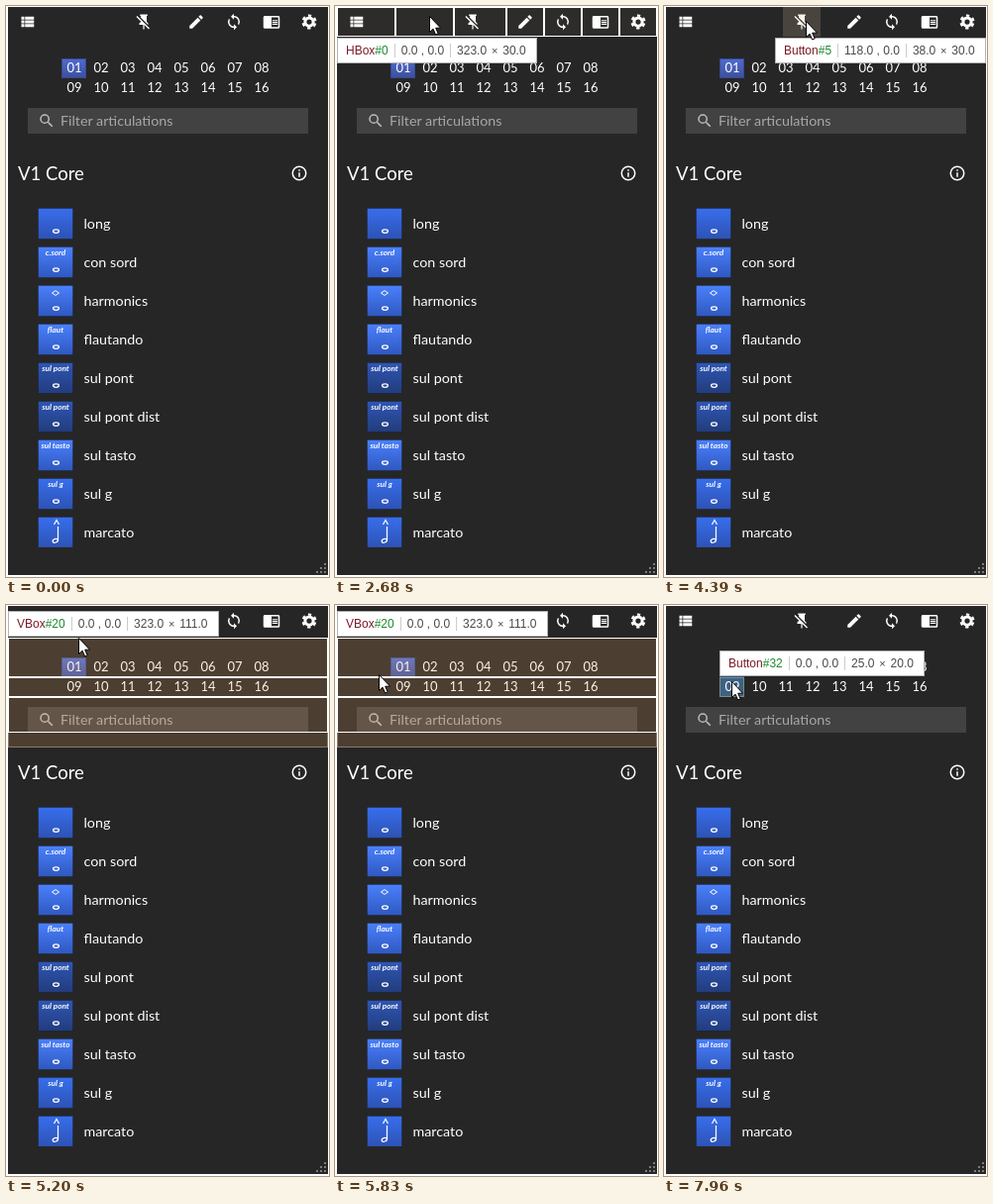
These frames come from a looping animation (326x577 px, 8 s). An HTML page:

```html
<!DOCTYPE html>
<html lang="en">
<head>
<meta charset="utf-8">
<title>Articulation panel</title>
<style>
  html, body { margin: 0; width: 100%; height: 100%; overflow: hidden; background: #fff; }
  svg { position: absolute; left: 0; top: 0; display: block; }
  text { font-family: Lato, Carlito, sans-serif; fill: #fff; }
  .num { font-size: 13px; text-anchor: middle; }
  .label { font-size: 14.3px; }
  .tag { font-size: 8.2px; font-weight: 700; font-style: italic; text-anchor: middle; }
  .line { fill: none; stroke: #fff; }
  #tip {
    position: absolute; box-sizing: border-box; height: 26px; padding: 0 10px 0 8px;
    display: flex; align-items: center; white-space: pre;
    background: #fff; border: 1px solid #b4b4b4;
    font: 12px "Liberation Sans", Arial, sans-serif; color: #4a4a4a;
  }
  #tip span { padding-left: 6px; margin-left: 6px; border-left: 1px solid #ccc; }
  #tip b { font-weight: 400; color: #7a1a28; }
  #tip i { font-style: normal; color: #1c8a2c; }
  #tip small { font-size: 11px; margin: 0 1.5px; }
</style>
</head>
<body>
<svg id="stage" width="326" height="577" viewBox="0 0 326 577">
  <defs>
    <linearGradient id="mid" x2="0" y2="1"><stop stop-color="#386eec"/><stop offset="1" stop-color="#2d52b4"/></linearGradient>
    <linearGradient id="light" x2="0" y2="1"><stop stop-color="#4a80fc"/><stop offset="1" stop-color="#2f58c0"/></linearGradient>
    <linearGradient id="dark" x2="0" y2="1"><stop stop-color="#2f56b4"/><stop offset="1" stop-color="#223c7c"/></linearGradient>
    <linearGradient id="sel" x2="0" y2="1"><stop stop-color="#4f6bd0"/><stop offset="1" stop-color="#3d509c"/></linearGradient>
    <clipPath id="view"><rect x="2" y="144" width="323" height="403"/></clipPath>
  </defs>
  <rect x="2" y="1" width="323" height="574" fill="#262626"/>
  <g id="cells"></g>
  <g id="icons" fill="#fff"></g>
  <rect x="22" y="103" width="283" height="26" fill="#424242"/>
  <g id="find" fill="#bdbdbd"></g>
  <text x="55" y="121" class="label" style="fill:#a8a8a8">Filter articulations</text>
  <text x="12" y="176" font-size="18.5">V1 Core</text>
  <g id="info" fill="#fff"></g>
  <rect x="56.5" y="53.5" width="24" height="19" fill="url(#sel)" stroke="#364a94"/>
  <g id="hot"></g>
  <g id="nums"></g>
  <g id="rows" clip-path="url(#view)"></g>
  <g id="grip" fill="#7c7c7c"></g>
  <g id="over"></g>
</svg>
<div id="tip"></div>
<svg width="326" height="577">
  <path id="cursor" d="M.5 .5V16.5L4.1 13.2L6.6 19L9.2 17.9L6.7 12.2H11.6Z" fill="#fff" stroke="#000" stroke-linejoin="round"/>
</svg>
<script>
const $ = id => document.getElementById(id);
const rect = (x, y, w, h, rest) => `<rect x="${x}" y="${y}" width="${w}" height="${h}" ${rest}/>`;
const box = (x, y, w, h) => rect(x + .5, y + .5, w - 1, h - 1, 'class="line"');
const icon = (cx, cy, body) => `<g transform="translate(${cx - 9} ${cy - 9}) scale(.75)">${body}</g>`;
const path = d => `<path d="${d}"/>`;

const list = path('M4 5h4v4H4zM4 10h4v4H4zM4 15h4v4H4zM9 5h12v4H9zM9 10h12v4H9zM9 15h12v4H9z');
const pinOff = path('M2 5.27L3.28 4L20 20.72L18.73 22L12.8 16.07V22H11.2V16H6V14L8 12V11.27ZM16 12L18 14V16H17.82L8 6.18V4H7V2H17V4H16Z');
const pencil = path('M20.71 7.04C21.1 6.65 21.1 6 20.71 5.63L18.37 3.29C18 2.9 17.35 2.9 16.96 3.29L15.12 5.12L18.87 8.87ZM3 17.25V21H6.75L17.81 9.93L14.06 6.18Z');
const half = path('M12 4V1L8 5L12 9V6A6 6 0 0 1 18 12C18 13 17.75 13.97 17.3 14.8L18.76 16.26A8 8 0 0 0 12 4Z');
const sync = half + `<g transform="rotate(180 12 12)">${half}</g>`;
const reader = path('M13 12h7v1.5h-7zM13 9.5h7V11h-7zM13 14.5h7V16h-7zM21 4H3c-1.1 0-2 .9-2 2v13c0 1.1.9 2 2 2h18c1.1 0 2-.9 2-2V6c0-1.1-.9-2-2-2zm0 15h-9V6h9z');
const gear = `<g fill="none" stroke="#fff"><circle cx="12" cy="12" r="5.5" stroke-width="4"/>
  <circle cx="12" cy="12" r="8.5" stroke-width="3" pathLength="12" stroke-dasharray="1 1" stroke-dashoffset="-.5"/></g>`;
const lens = path('M15.5 14h-.79l-.28-.27A6.47 6.47 0 0 0 16 9.5 6.5 6.5 0 1 0 9.5 16c1.61 0 3.09-.59 4.23-1.57l.27.28v.79l5 4.99L20.49 19zm-6 0a4.5 4.5 0 1 1 0-9 4.5 4.5 0 0 1 0 9z');
const info = '<circle cx="12" cy="12" r="9" fill="none" stroke="#fff" stroke-width="2"/>' + path('M11 7h2v2h-2zM11 11h2v6h-2z');

$('icons').innerHTML = [[21.5, list], [139, pinOff], [192, pencil], [230, sync], [268, reader], [306, gear]]
  .map(([x, body]) => icon(x, 16, body)).join('');
$('find').innerHTML = icon(41, 116, lens);
$('info').innerHTML = icon(296, 169, info);

$('nums').innerHTML = Array.from({ length: 16 }, (_, i) =>
  `<text class="num" x="${69 + i % 8 * 27}" y="${i < 8 ? 67 : 87}">${String(i + 1).padStart(2, '0')}</text>`).join('');

const whole = '<ellipse cx="18.5" cy="23.6" rx="2.9" ry="1.7" fill="none" stroke="#fff" stroke-width="1.3"/>';
const diamond = '<path class="line" d="M14.5 8L18 5.6L21.5 8L18 10.4Z"/>';
const marcato = '<path class="line" stroke-width="1.2" d="M16.5 8L19 3.5L21.5 8M20.5 10V24"/>' +
  '<ellipse cx="17.8" cy="24.3" rx="2.7" ry="1.8" class="line" stroke-width="1.2" transform="rotate(-20 17.8 24.3)"/>';
const tag = s => `<text class="tag" x="18" y="9">${s}</text>`;
const rows = [
  ['long', 'mid', ''], ['con sord', 'light', tag('c.sord')], ['harmonics', 'light', diamond],
  ['flautando', 'light', tag('flaut')], ['sul pont', 'dark', tag('sul pont')],
  ['sul pont dist', 'dark', tag('sul pont')], ['sul tasto', 'light', tag('sul tasto')],
  ['sul g', 'mid', tag('sul g')], ['marcato', 'mid', null]
];
$('rows').innerHTML = rows.map(([name, fill, mark], i) =>
  `<g transform="translate(32 ${204 + 39 * i})">
    ${rect(.5, .5, 35, 31, `fill="url(#${fill})" stroke="#000" stroke-opacity=".22"`)}
    ${mark === null ? marcato : mark + whole}
    <text class="label" x="46.5" y="21">${name}</text></g>`).join('');

for (let r = 0; r < 3; r++)
  for (let c = 0; c <= r; c++)
    $('grip').innerHTML += rect(321 - c * 4, 563 + r * 4, 2, 2, '');

// Inspector states: highlight layers and tooltip
const edges = [2, 61, 120, 173, 211, 249, 287, 325];
const tint = 'fill="#d7be9e" opacity=".2"';
const states = {
  none: {},
  bar: {
    cells: rect(2, 1, 323, 30, 'fill="#2e2c2b"') +
      edges.slice(1).map((x, i) => box(edges[i], 1, x - edges[i], 30)).join(''),
    tip: ['HBox', 0, '0.0 , 0.0', '323.0', '30.0'], left: 2, top: 32
  },
  pin: { over: rect(120, 1, 38, 30, tint), tip: ['Button', 5, '118.0 , 0.0', '38.0', '30.0'], top: 32 },
  edit: { over: rect(174, 1, 38, 30, tint), tip: ['Button', 7, '172.0 , 0.0', '38.0', '30.0'], top: 32 },
  grid: {
    over: rect(2, 33, 323, 111, 'fill="#f6b26b" opacity=".18"') +
      rect(2.5, 33.5, 322, 110, 'fill="none" stroke="#8c7a68"') +
      box(2, 33, 323, 40) + box(2, 73, 323, 20) + box(2, 93, 323, 36),
    tip: ['VBox', 20, '0.0 , 0.0', '323.0', '111.0'], left: 2, top: 6
  },
  one: {
    hot: rect(56.5, 53.5, 24, 19, 'fill="#3076b0" stroke="#56a6cc"'),
    tip: ['Button', 23, '0.0 , 0.0', '25.0', '20.0'], left: 56, top: 26
  },
  nine: {
    hot: rect(56.5, 73.5, 24, 19, 'fill="#3f6183" stroke="#6f957f"'),
    tip: ['Button', 32, '0.0 , 0.0', '25.0', '20.0'], left: 56, top: 46
  }
};

// time, pointer x, pointer y, state
const steps = [
  [0, -40, -40, 'none'],
  [1030, 100, 0, 'bar'], [1120, 92, 2, 'bar'], [1210, 86, 4, 'bar'], [1300, 80, 6, 'bar'], [1380, 76, 8, 'bar'],
  [2590, 84, 9, 'bar'], [2680, 95, 10, 'bar'], [2770, 107, 12, 'bar'], [2860, 118, 13, 'bar'],
  [2950, 130, 14, 'pin'], [3030, 138, 14, 'pin'],
  [3220, 150, 15, 'pin'], [3300, 160, 15, 'pin'], [3390, 170, 16, 'bar'], [3480, 180, 16, 'edit'],
  [3660, 184, 17, 'edit'], [3750, 187, 18, 'edit'],
  [4120, 165, 16, 'edit'], [4210, 147, 15, 'pin'],
  [4390, 143, 15, 'pin'], [4480, 138, 15, 'pin'], [4570, 124, 16, 'pin'], [4660, 110, 17, 'bar'],
  [4750, 98, 18, 'bar'], [4840, 88, 19, 'bar'], [4930, 80, 20, 'bar'],
  [5110, 77, 24, 'bar'], [5200, 73, 33, 'grid'], [5290, 70, 41, 'grid'], [5380, 66, 49, 'grid'],
  [5470, 64, 55, 'one'], [5560, 62, 60, 'one'], [5650, 57, 65, 'one'], [5740, 50, 68, 'grid'], [5830, 44, 70, 'grid'],
  [6670, 47, 69, 'grid'], [6760, 50, 68, 'grid'],
  [7600, 61, 68, 'grid'], [7690, 64, 70, 'one'], [7780, 65, 70, 'one'],
  [7960, 68, 77, 'nine']
];

function show(name) {
  const s = states[name], tip = $('tip');
  for (const layer of ['cells', 'hot', 'over']) $(layer).innerHTML = s[layer] || '';
  tip.style.display = s.tip ? 'flex' : 'none';
  if (!s.tip) return;
  const [kind, id, pos, w, h] = s.tip;
  tip.innerHTML = `<b>${kind}</b><i>#${id}</i><span>${pos}</span><span>${w} <small>×</small> ${h}</span>`;
  tip.style.top = s.top + 'px';
  const free = 325 - tip.offsetWidth;
  tip.style.left = (s.left ?? free) + 'px';
}

const start = performance.now();
let shown = '';
function draw() {
  const t = (performance.now() - start) % 8000;
  const [, x, y, name] = steps.findLast(s => s[0] <= t);
  if (name !== shown) show(shown = name);
  $('cursor').setAttribute('transform', `translate(${x} ${y})`);
  requestAnimationFrame(draw);
}
draw();
</script>
</body>
</html>
```
